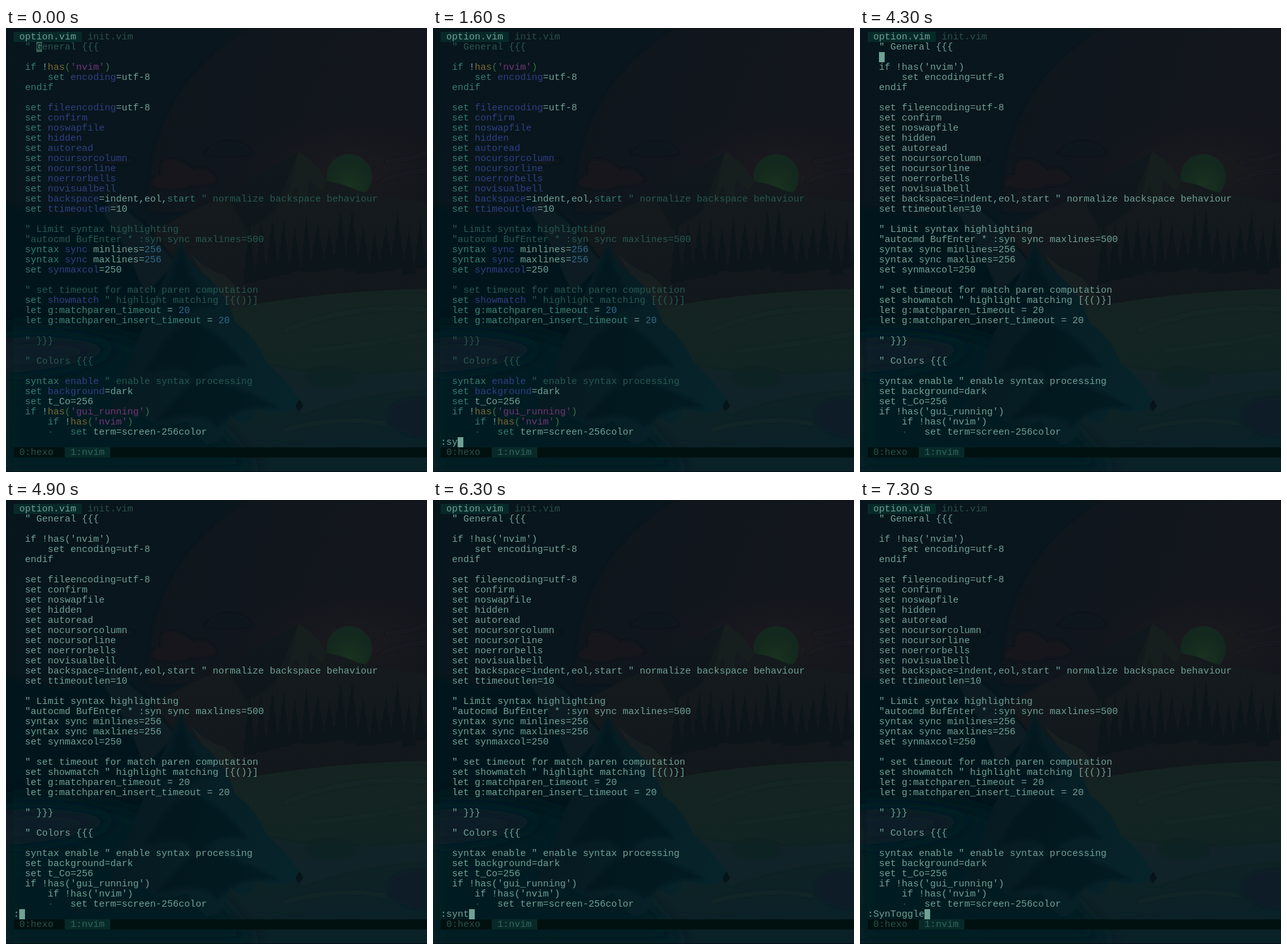
Animation, 666 px wide and 701 px high, one loop 8000 ms. Source, as an HTML page:

```html
<!DOCTYPE html>
<html lang="en">
<head>
<meta charset="utf-8">
<title>Vim syntax toggle</title>
<style>
  html, body { margin: 0; width: 100%; height: 100%; overflow: hidden; background: #07151c; }
  svg { position: absolute; left: 0; top: 0; }
  text { font: 15px "Liberation Mono", monospace; white-space: pre; fill: #6fa195; }
  .on { fill: #072a29; }
  .bar { fill: #011110; }
  .ink { fill: #07171c; }
  .dim, #code .d { fill: #2a514a; }
  .active { fill: #32655b; }
  #block { fill: #6fa195; }
  #block.word { fill: #356258; }
  .c { fill: #275850; }
  .k { fill: #347d70; }
  .v { fill: #3c8476; }
  .o { fill: #303f83; }
  .s { fill: #74357a; }
  .f { fill: #7b6a31; }
  .p { fill: #37733f; }
  .n { fill: #32698a; }
  .plain tspan { fill: inherit; }
</style>
</head>
<body>
<svg width="666" height="701" viewBox="0 0 666 701">
  <defs>
    <linearGradient id="sky" x1="0" y1="0" x2="1" y2=".35">
      <stop offset="0" stop-color="#07151c"/>
      <stop offset=".4" stop-color="#09161d"/>
      <stop offset="1" stop-color="#14171e"/>
    </linearGradient>
    <linearGradient id="field" x1="0" y1="0" x2=".2" y2="1">
      <stop offset="0" stop-color="#152320"/>
      <stop offset=".5" stop-color="#122422"/>
      <stop offset="1" stop-color="#0a2128"/>
    </linearGradient>
    <linearGradient id="peak" x1="0" y1="0" x2="0" y2="1">
      <stop offset="0" stop-color="#151b1d"/>
      <stop offset="1" stop-color="#11171c"/>
    </linearGradient>
    <linearGradient id="pine" x1="0" y1=".4" x2="1" y2=".6">
      <stop offset="0" stop-color="#06191f"/>
      <stop offset="1" stop-color="#07242b"/>
    </linearGradient>
    <radialGradient id="sun" cy=".65">
      <stop offset="0" stop-color="#19321f"/>
      <stop offset="1" stop-color="#13281e"/>
    </radialGradient>
    <radialGradient id="glow">
      <stop offset="0" stop-color="#1c1a1e"/>
      <stop offset="1" stop-color="#18191e" stop-opacity="0"/>
    </radialGradient>
    <filter id="soft"><feGaussianBlur stdDeviation="2"/></filter>
    <filter id="haze" x="-20%" y="-20%" width="140%" height="140%"><feGaussianBlur stdDeviation="12"/></filter>
  </defs>
  <rect width="666" height="701" fill="url(#sky)"/>
  <path d="M225 290Q220 100 385 0H666V300Z" fill="#12171d" opacity=".45" filter="url(#soft)"/>
  <ellipse cx="545" cy="225" rx="170" ry="85" fill="url(#glow)"/>
  <g filter="url(#soft)">
    <path d="M230 248Q230 232 246 232Q240 205 265 207Q285 212 295 224Q318 214 334 240Q318 252 292 248Q270 262 230 248Z" fill="#17191b"/>
    <path d="M312 198Q340 174 362 180Q385 185 389 198Q355 206 312 198Z" fill="#0c151b"/>
    <path d="M150 213Q180 202 206 209Q190 218 150 213Z" fill="#10171c"/>
    <path d="M590 244Q630 224 666 226M600 212Q640 206 666 198" fill="none" stroke="#1b1b20" stroke-width="3"/>
  </g>
  <circle cx="543" cy="235" r="36" fill="url(#sun)"/>
  <path d="M190 345L290 290L350 264L405 226L440 206L462 194L480 207L495 222L508 242L532 247L560 258L580 262L666 276V450H190Z" fill="url(#peak)"/>
  <path d="M462 194L480 207L495 222L508 242L500 258L480 240L474 285L458 250L440 290Z" fill="#181f1f" opacity=".75"/>
  <path d="M462 196L444 240L425 290L380 320L350 264L405 226Z" fill="#0d171b" opacity=".6"/>
  <g id="woods" fill="#0b151a"/>
  <path d="M0 490Q140 440 300 455Q470 415 666 412V701H0Z" fill="url(#field)"/>
  <path d="M0 280L100 300L160 268L215 305L275 380V520H0Z" fill="#06171d" filter="url(#soft)"/>
  <path d="M150 285L172 272L212 305L268 372L220 420L190 350Z" fill="#071c23" filter="url(#soft)"/>
  <path d="M0 470Q120 460 220 500L400 701H0Z" fill="#061a21" filter="url(#haze)"/>
  <path d="M0 490Q80 480 170 505Q130 535 0 545Z" fill="#081f26" filter="url(#haze)"/>
  <g filter="url(#soft)">
    <path d="M380 520Q470 560 666 540V570Q540 580 470 610Z" fill="#0c2427" opacity=".7"/>
    <path d="M472 550Q480 530 540 541Q570 558 525 568Q480 570 472 550Z" fill="#0c2124"/>
    <path d="M440 478Q540 435 666 444M480 510Q580 500 666 482M440 635Q530 610 600 625" fill="none" stroke="#172725" stroke-width="4"/>
    <path d="M604 606Q615 582 666 584V646Q608 644 604 606Z" fill="#091f26"/>
  </g>
  <path d="M277 335Q300 375 345 390Q370 410 382 440L350 445Z" fill="#171f20"/>
  <path d="M277 335Q288 372 318 392Q350 422 364 466Q398 490 412 528Q450 560 468 596Q430 616 395 600Q386 640 354 612Q345 656 318 657Q300 645 285 620Q250 640 212 610Q180 625 160 610L185 560L205 500L235 430L258 380Z" fill="url(#pine)"/>
  <g fill="#05181e" opacity=".65" filter="url(#soft)">
    <path d="M277 350Q285 400 330 440Q300 430 270 470Q270 430 235 440L262 396Z"/>
    <path d="M290 460Q350 490 380 535Q330 520 300 565Q290 520 220 545L255 490Z"/>
    <path d="M310 550Q380 570 430 600Q370 590 335 630Q312 600 240 618L280 575Z"/>
  </g>
  <path d="M464 586L470 597L463 605L458 597Z" fill="#07141a"/>
  <rect y="700" width="666" height="1" fill="#031015"/>

  <rect class="on" x="12" y="6" width="108" height="16"/>
  <text x="21" y="18">option.vim</text>
  <text class="dim" x="129" y="18">init.vim</text>
  <rect class="bar" x="12" y="662" width="654" height="16"/>
  <rect class="on" x="93" y="662" width="72" height="16"/>
  <text class="dim" x="21" y="674">0:hexo</text>
  <text class="active" x="102" y="674">1:nvim</text>
  <g id="code"></g>
  <text id="cmd" x="12" y="658"></text>
  <g id="cursor">
    <rect id="block" width="9" height="16"/>
    <text id="letter" class="ink" y="12">G</text>
  </g>
</svg>
<script>
const source = String.raw`" General {{{

if !has('nvim')
    set encoding=utf-8
endif

set fileencoding=utf-8
set confirm
set noswapfile
set hidden
set autoread
set nocursorcolumn
set nocursorline
set noerrorbells
set novisualbell
set backspace=indent,eol,start " normalize backspace behaviour
set ttimeoutlen=10

" Limit syntax highlighting
"autocmd BufEnter * :syn sync maxlines=500
syntax sync minlines=256
syntax sync maxlines=256
set synmaxcol=250

" set timeout for match paren computation
set showmatch " highlight matching [{()}]
let g:matchparen_timeout = 20
let g:matchparen_insert_timeout = 20

" }}}

" Colors {{{

syntax enable " enable syntax processing
set background=dark
set t_Co=256
if !has('gui_running')
    if !has('nvim')
    ·   set term=screen-256color`;

// Each named group is the CSS class of its token.
const token = /(?<c>".*)|(?<s>'\w+')|(?<k>\b(?:set|if|endif|let|syntax|start)\b)|(?<v>g:\w+)|(?<f>has)|(?<p>[()])|(?<o>(?<=set )(?!t_Co|term\b)\w+|\b(?:sync|enable)\b)|(?<n>(?<=lines=|= )\d+)|(?<d>·)/g;

const paint = line => line.replace(token, (text, ...rest) => {
  const groups = rest[rest.length - 1];
  const kind = Object.keys(groups).find(name => groups[name]);
  return `<tspan class="${kind}">${text}</tspan>`;
});

const $ = id => document.getElementById(id);
const code = $('code'), cmd = $('cmd'), cursor = $('cursor'), block = $('block'), letter = $('letter');
const colX = col => 12 + 9 * col;
const rowY = row => 6 + 16 * row;

code.innerHTML = source.split('\n').map((line, i) =>
  `<text x="${colX(2)}" y="${rowY(i + 1) + 12}">${paint(line)}</text>`).join('');

// Distant pines with a seeded random size
let seed = 7;
const random = () => (seed = seed * 16807 % 2147483647) / 2147483647;
let pines = '';
for (let x = 385; x < 680; x += 18) {
  const base = 404 - (x - 385) * 0.05 - random() * 18;
  const h = 60 + random() * 45, w = 9 + random() * 5;
  pines += `M${x} ${base - h}`;
  for (let i = 1; i <= 4; i++) pines += `L${x + w * i / 4} ${base - h + h * i / 4}l${-w / 6} -3`;
  for (let i = 4; i >= 1; i--) pines += `L${x - w * i / 4} ${base - h + h * i / 4}l${w / 6} -3`;
  pines += 'Z';
}
$('woods').innerHTML = `<path d="${pines}"/>`;

// Start time and command line; an empty command leaves the cursor in the text.
const steps = [
  [0, ''], [1300, ':'], [1400, ':s'], [1600, ':sy'], [1900, ':syn'],
  [2100, ':synt'], [2300, ':synto'], [2400, ':syntog'],
  [4300, ''], [4900, ':'], [5700, ':s'], [5900, ':sy'], [6100, ':syn'],
  [6300, ':synt'], [6700, ':syntogg'], [7000, ':syntoggl'],
  [7100, ':syntoggle'], [7300, ':SynToggle']
];
const LOOP = 8000;
const start = performance.now();

function draw(t) {
  const text = steps.filter(step => step[0] <= t).pop()[1];
  const onWord = t < 600;
  const [col, row] = text ? [text.length, 40] : onWord ? [4, 1] : [2, 2];
  cmd.textContent = text;
  code.setAttribute('class', t < 4300 ? '' : 'plain');
  block.setAttribute('class', onWord ? 'word' : '');
  letter.textContent = onWord ? 'G' : '';
  cursor.setAttribute('transform', `translate(${colX(col)} ${rowY(row)})`);
}

function tick() {
  draw((performance.now() - start) % LOOP);
  requestAnimationFrame(tick);
}
tick();
</script>
</body>
</html>
```
